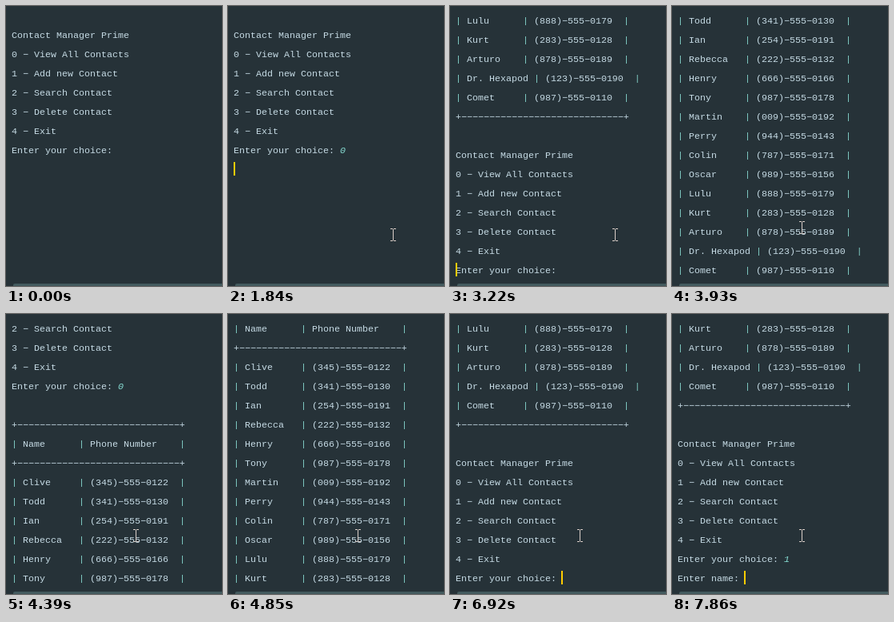
An HTML page that plays this animation: 270x350 px, repeating every 8000 ms.

```html
<!DOCTYPE html>
<html lang="en">
<head>
<meta charset="utf-8">
<title>Contact manager console</title>
<style>
html, body { margin: 0; width: 100%; height: 100%; overflow: hidden; background: #263238; }
#stage { position: relative; width: 270px; height: 350px; overflow: hidden; background: #263238; }
#stage > * { position: absolute; left: 0; top: 0; }
#stage, #stage * { animation: 8s step-end infinite; }
#log {
  left: 7px; top: 25px; margin: 0; white-space: pre; color: #c6dbe5;
  font: 11.666px/24px "Liberation Mono", "Courier New", monospace;
}
#stage #log { animation-name: scroll; }
#log b { font-weight: normal; color: #80cbc4; }
#log i { color: #86dcd2; opacity: 0; }
#stage .first { animation-name: first; }
#stage .slip { position: absolute; animation-name: slip; }
#stage .second { animation-name: second; }
#stage .output { opacity: 0; animation-name: output; }
#stage #caret { width: 2px; height: 17px; background: #ffcc00; opacity: 0; animation-name: caret; }
#stage #mouse { width: 7px; height: 16px; opacity: 0; animation-name: mouse; }
#stage #bar { left: 9px; top: 347px; width: 270px; height: 8px; border-radius: 2px; background: #435a5e; }

@keyframes scroll {
  0% { transform: translateY(0); }
  25.875% { transform: translateY(-522px); }
  49.125% { transform: translateY(-306px); }
  52% { transform: translateY(-162px); }
  54.875% { transform: translateY(-90px); }
  57.75% { transform: translateY(-162px); }
  60.625% { transform: translateY(-234px); }
  63.5% { transform: translateY(-378px); }
  66.375% { transform: translateY(-522px); }
  95.375%, 100% { transform: translateY(-546px); }
}
@keyframes first { 0% { opacity: 0; } 20.125%, 100% { opacity: 1; } }
@keyframes output { 0% { opacity: 0; } 25.875%, 100% { opacity: 1; } }
@keyframes slip { 0% { opacity: 0; } 80.75% { opacity: 1; } 86.5%, 100% { opacity: 0; } }
@keyframes second { 0% { opacity: 0; } 89.375%, 100% { opacity: 1; } }
@keyframes caret {
  0% { opacity: 0; transform: translate(139px, 171px); }
  8.625% { opacity: 1; transform: translate(139px, 171px); }
  20.125% { opacity: 1; transform: translate(146px, 171px); }
  23% { opacity: 1; transform: translate(7px, 195px); }
  25.875%, 40.25%, 66.375%, 75%, 95.375% { opacity: 1; transform: translate(7px, 321px); }
  31.625%, 46%, 69.25% { opacity: 0; transform: translate(7px, 321px); }
  80.75%, 89.375% { opacity: 1; transform: translate(146px, 321px); }
  86.5% { opacity: 1; transform: translate(139px, 321px); }
  98.25%, 100% { opacity: 1; transform: translate(90px, 321px); }
}
@keyframes mouse {
  0% { opacity: 0; transform: translate(221px, 309px); }
  2.875% { opacity: 1; transform: translate(221px, 309px); }
  5.75% { opacity: 1; transform: translate(219px, 306px); }
  8.625% { opacity: 1; transform: translate(203px, 278px); }
  49.125%, 100% { opacity: 1; transform: translate(159px, 269px); }
}
</style>
</head>
<body>
<div id="stage">
  <pre id="log"></pre>
  <div id="caret"></div>
  <div id="bar"></div>
  <svg id="mouse" viewBox="0 0 7 16" fill="#d9cdc7" shape-rendering="crispEdges">
    <path d="M0 0h3v1H0zM4 0h3v1H4zM3 1h1v14H3zM0 15h3v1H0zM4 15h3v1H4z"/>
  </svg>
</div>
<script>
const contacts = [
  ["Clive", "(345)-555-0122"],
  ["Todd", "(341)-555-0130"],
  ["Ian", "(254)-555-0191"],
  ["Rebecca", "(222)-555-0132"],
  ["Henry", "(666)-555-0166"],
  ["Tony", "(987)-555-0178"],
  ["Martin", "(009)-555-0192"],
  ["Perry", "(944)-555-0143"],
  ["Colin", "(787)-555-0171"],
  ["Oscar", "(989)-555-0156"],
  ["Lulu", "(888)-555-0179"],
  ["Kurt", "(283)-555-0128"],
  ["Arturo", "(878)-555-0189"],
  ["Dr. Hexapod", "(123)-555-0190"],
  ["Comet", "(987)-555-0110"]
];
const menu = [
  "Contact Manager Prime",
  "0 - View All Contacts",
  "1 - Add new Contact",
  "2 - Search Contact",
  "3 - Delete Contact",
  "4 - Exit",
  "Enter your choice: "
].join("\n");
const rule = "+" + "-".repeat(29) + "+";
const pipe = "<b>|</b>";
const row = ([name, phone]) =>
  `${pipe} ${name.padEnd(9)} ${pipe} ${phone.padEnd(14)}  ${pipe}`;

const table = [rule, row(["Name", "Phone Number"]), rule, ...contacts.map(row), rule].join("\n");
const output = `\n\n${table}\n\n${menu}<i class="slip">0</i><i class="second">1</i>\nEnter name: `;
const log = `${menu}<i class="first">0</i><span class="output">${output}</span>`;

// The minus sign gives the wide, high dash of a typewriter face.
document.getElementById("log").innerHTML = log.replace(/-/g, "\u2212");
</script>
</body>
</html>
```
